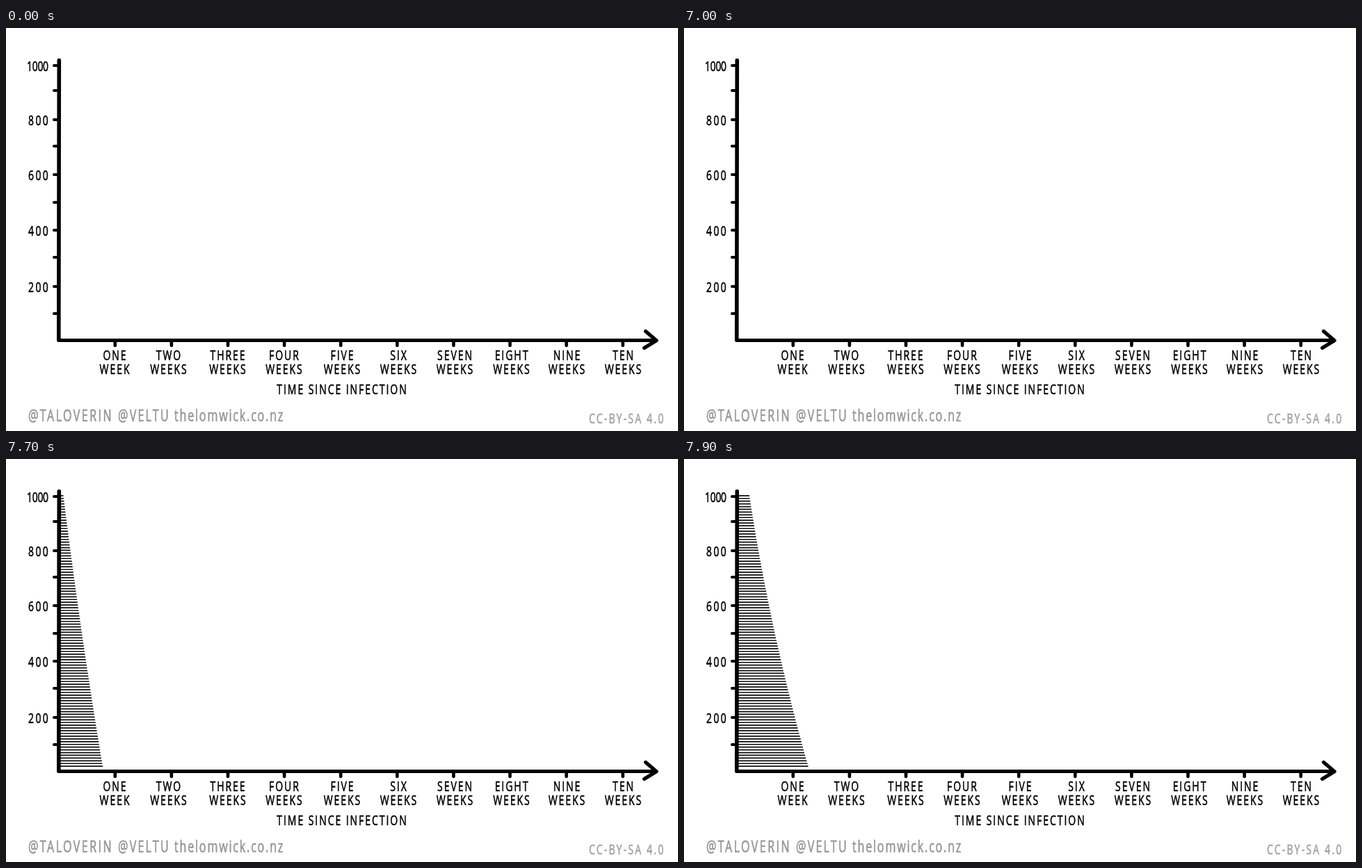
Animation, 966 px wide and 580 px high, one loop 8 s. Source, as an HTML page:

```html
<!DOCTYPE html>
<html lang="en">
<head>
<meta charset="utf-8">
<title>Time since infection</title>
<style>
  html, body { margin: 0; width: 100%; height: 100%; overflow: hidden; background: #fff; }
  svg { display: block; width: 100vw; height: 100vh; }
  text { font-family: "Open Sans", "Noto Sans", sans-serif; stroke-linejoin: round; white-space: pre; }
  .ink { fill: none; stroke: #000; stroke-linecap: round; stroke-linejoin: round; }
</style>
</head>
<body>
<svg id="stage" viewBox="0 0 966 580"></svg>
<script>
const NS = "http://www.w3.org/2000/svg";
const stage = document.getElementById("stage");
const LOOP = 8000;
const NARROW = 0.7; // one condensed lettering style for all text

function add(tag, attrs, parent = stage) {
  const el = document.createElementNS(NS, tag);
  for (const key in attrs) el.setAttribute(key, attrs[key]);
  parent.appendChild(el);
  return el;
}

function label(str, x, y, { size = 20, gap = 1.95, anchor = "middle", fill = "#000", parent = stage } = {}) {
  const shift = anchor === "middle" ? gap / 2 : 0;
  add("text", {
    transform: `translate(${x + shift} ${y}) scale(${NARROW} 1)`,
    "font-size": size,
    "letter-spacing": gap / NARROW,
    "text-anchor": anchor,
    fill,
    stroke: fill,
    "stroke-width": size * 0.03
  }, parent).textContent = str;
}

const ink = (d, width) => add("path", { d, class: "ink", "stroke-width": width });

// Hatched area behind the axes
const hatch = add("path", { fill: "none", stroke: "#0c0c0c", "stroke-width": 1.7 });

// Axes
ink("M76.3 46.5L75.8 449", 5.6);
ink("M76 449.5H933", 5.2);
ink("M919.5 436.5L935 449.7L917.5 460.5", 5.2);

// Vertical scale
[54, 90, 132, 170, 211, 251, 291, 330, 372, 411].forEach((y, i) => {
  ink(`M69 ${y}H75`, 4);
  if (i % 2) return;
  const value = 1000 - i * 100;
  const top = value === 1000;
  label(String(value), top ? 30 : 32, y + 8, { gap: top ? -0.3 : 2.4, anchor: "start" });
});

// Weeks
const weeks = ["ONE", "TWO", "THREE", "FOUR", "FIVE", "SIX", "SEVEN", "EIGHT", "NINE", "TEN"];
const centres = [156, 233.5, 318.5, 399.5, 483, 564, 645, 726.5, 806, 887];
weeks.forEach((name, i) => {
  ink(`M${156.8 + i * 81.1} 451V457`, 4.6);
  label(name, centres[i], 478);
  label(i ? "WEEKS" : "WEEK", centres[i], 498);
});
label("TIME SINCE INFECTION", 482.5, 527);

// Credits
const credit = { size: 23, fill: "#969696", anchor: "start" };
label("@TALOVERIN", 32, 566, { ...credit, gap: 2.4 });
label("@VELTU", 161, 566, { ...credit, gap: 2.2 });
label("thelomwick.co.nz", 242, 566, { ...credit, gap: 1.8 });
label("CC-BY-SA 4.0", 838, 569, { ...credit, size: 20, gap: 2.2, fill: "#a0a0a0" });

// Message card
const card = add("g", {});
add("rect", { x: 257.7, y: 153, width: 450, height: 200.2, fill: "#f9f4df", stroke: "#000", "stroke-width": 3.8 }, card);
[
  ["IMAGINE  1000", 483.5, 0.2],
  ["PEOPLE GET INFECTED.", 483.5, 1.2],
  ["ACCORDING TO CURRENT", 484, 0.55],
  ["AVERAGES WE MIGHT EXPECT...", 485, 1.8]
].forEach(([str, x, gap], i) =>
  label(str, x, 211.5 + i * 34, { size: 33, gap, parent: card }));

// Right edge of the hatching at the top and bottom, per step
const topEdge = [80, 81, 82.5, 87.5, 94];
const bottomEdge = [94, 117, 139, 159, 178.5];

function hatchPath(step) {
  const a = topEdge[step], b = bottomEdge[step];
  const bend = 0.075 * step;
  let d = "";
  for (let i = 0; i < 100; i++) {
    const u = i / 99;
    const right = a + (b - a) * (u - bend * u * (1 - u));
    d += `M77 ${(52.8 + 389.4 * u).toFixed(2)}H${right.toFixed(1)}`;
  }
  return d;
}
const hatchSteps = topEdge.map((_, i) => hatchPath(i));

function render(t) {
  card.setAttribute("visibility", t >= 1000 && t < 7000 ? "visible" : "hidden");
  const step = Math.floor((t - 7500) / 100);
  hatch.setAttribute("d", hatchSteps[step] || "");
}

const start = performance.now();
function tick() {
  render((performance.now() - start) % LOOP);
  requestAnimationFrame(tick);
}
tick();
</script>
</body>
</html>
```
